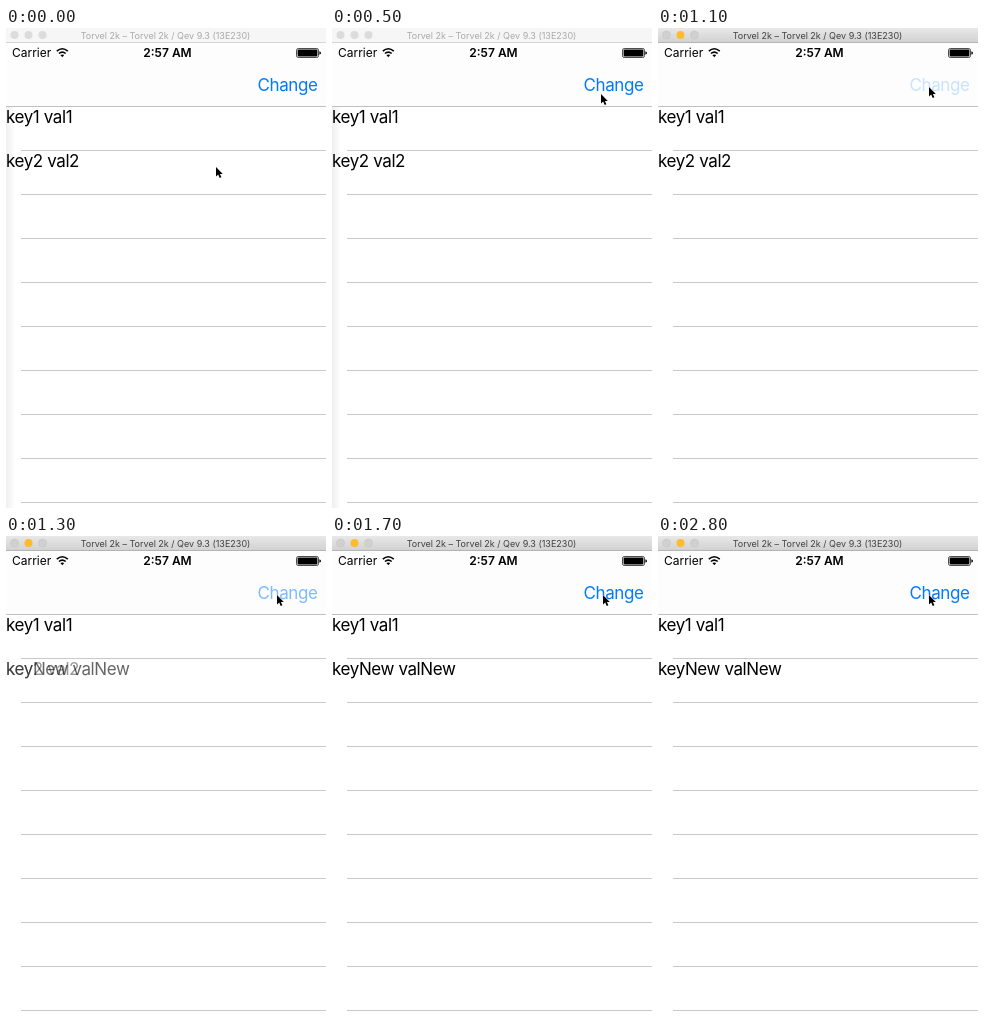
Write an HTML page that moves like this. It is 320 by 480 pixels and loops after 3100 ms.

```html
<!DOCTYPE html>
<html lang="en">
<head>
<meta charset="utf-8">
<title>Row change</title>
<style>
  html, body { margin: 0; width: 100%; height: 100%; overflow: hidden; background: #fff; }
  svg { display: block; width: 100vw; height: 100vh; font-family: Inter, Roboto, sans-serif; }
  .body { font-size: 17px; letter-spacing: -.41px; }
  .small { font-size: 12px; }
  .title { font-size: 9px; text-anchor: middle; }
  .line { stroke: #c8c7cc; }
</style>
</head>
<body>
<svg viewBox="0 0 320 480">
  <defs>
    <linearGradient id="chrome" x2="0" y2="1">
      <stop stop-color="#e8e8e8"/><stop offset="1" stop-color="#d2d2d2"/>
    </linearGradient>
    <linearGradient id="edge">
      <stop stop-color="#efefef"/><stop offset="1" stop-color="#fff"/>
    </linearGradient>
  </defs>
  <rect width="320" height="480" fill="#fff"/>
  <rect y="15" width="320" height="63" fill="#fdfdfd"/>

  <g id="inactive">
    <rect width="320" height="14" fill="#f6f6f6"/>
    <path d="M0 14.5H320" stroke="#d5d5d5"/>
    <g fill="#dcdcdc"><circle cx="8.5" cy="7" r="4"/><circle cx="22.5" cy="7" r="4"/><circle cx="36.5" cy="7" r="4"/></g>
    <text class="title" x="159.5" y="10.7" fill="#a9a9a9">Torvel 2k – Torvel 2k / Qev 9.3 (13E230)</text>
    <rect y="79" width="9" height="401" fill="url(#edge)"/>
  </g>
  <g id="active">
    <rect width="320" height="14" fill="url(#chrome)"/>
    <path d="M0 14.5H320" stroke="#b4b4b4"/>
    <g fill="#d0d0d0" stroke="#c3c3c3" stroke-width=".5"><circle cx="8.5" cy="7" r="4"/><circle cx="36.5" cy="7" r="4"/></g>
    <circle cx="22.5" cy="7" r="4" fill="#fdbc2e"/>
    <text class="title" x="159.5" y="10.7" fill="#404040">Torvel 2k – Torvel 2k / Qev 9.3 (13E230)</text>
  </g>

  <text class="small" x="6" y="29.3">Carrier</text>
  <g fill="none" stroke="#000" stroke-width="1.6">
    <path d="M50.8 23.1Q56.3 18.4 61.8 23.1M52.9 25.5Q56.3 22.6 59.7 25.5"/>
    <path d="M56.3 29.2L54.4 27.1Q56.3 25.7 58.2 27.1Z" fill="#000" stroke="none"/>
  </g>
  <text class="small" x="161.5" y="29.3" text-anchor="middle" font-weight="600">2:57 AM</text>
  <rect x="290.5" y="20.5" width="22" height="9" rx="1.8" fill="none" stroke="#000" stroke-width=".7"/>
  <rect x="291.6" y="21.6" width="19.8" height="6.8" rx=".8"/>
  <path d="M313.4 23.3q1.6 .4 1.6 1.7t-1.6 1.7z"/>

  <text id="button" class="body" x="311.5" y="63" text-anchor="end" fill="#007aff">Change</text>
  <path d="M0 78.5H320" stroke="#c0c0c2"/>
  <g id="lines" class="line"></g>

  <g class="body">
    <text x="0" y="95">key1 val1</text>
    <text id="oldRow" x="0" y="139">key2 val2</text>
    <text id="newRow" x="0" y="139">keyNew valNew</text>
  </g>

  <path id="cursor" d="M0 0V9.6L2.2 7.6L3.7 11L5.4 10.2L3.9 6.9H6.8Z" stroke="#fff" stroke-width="1" paint-order="stroke" stroke-linejoin="round"/>
</svg>
<script>
  const LOOP = 3100;
  const el = id => document.getElementById(id);

  el('lines').innerHTML = Array.from({ length: 9 },
    (_, i) => `<path d="M15 ${122.5 + 44 * i}H320"/>`).join('');

  // Each table lists [ms, value]; a value holds until the next entry.
  function play(id, property, table) {
    const frames = table.map(([ms, value]) =>
      ({ offset: ms / LOOP, [property]: value, easing: 'step-end' }));
    frames.push({ offset: 1, [property]: table.at(-1)[1] });
    el(id).animate(frames, { duration: LOOP, iterations: Infinity });
  }

  const path = [[210, 139], [221, 127], [239, 107], [254, 91], [264, 76], [269, 66], [271, 61], [271, 59]];
  play('cursor', 'transform', path.map(([x, y], i) => [i * 100, `translate(${x}px, ${y}px)`]));
  play('inactive', 'opacity', [[0, 1], [1100, 0]]);
  play('active', 'opacity', [[0, 0], [1100, 1]]);
  play('button', 'opacity', [[0, 1], [1100, .2], [1200, .25], [1300, .5], [1400, .78], [1500, .93], [1600, 1]]);
  play('oldRow', 'opacity', [[0, 1], [1200, .85], [1300, .4], [1400, 0]]);
  play('newRow', 'opacity', [[0, 0], [1200, .15], [1300, .6], [1400, 1]]);
</script>
</body>
</html>
```
